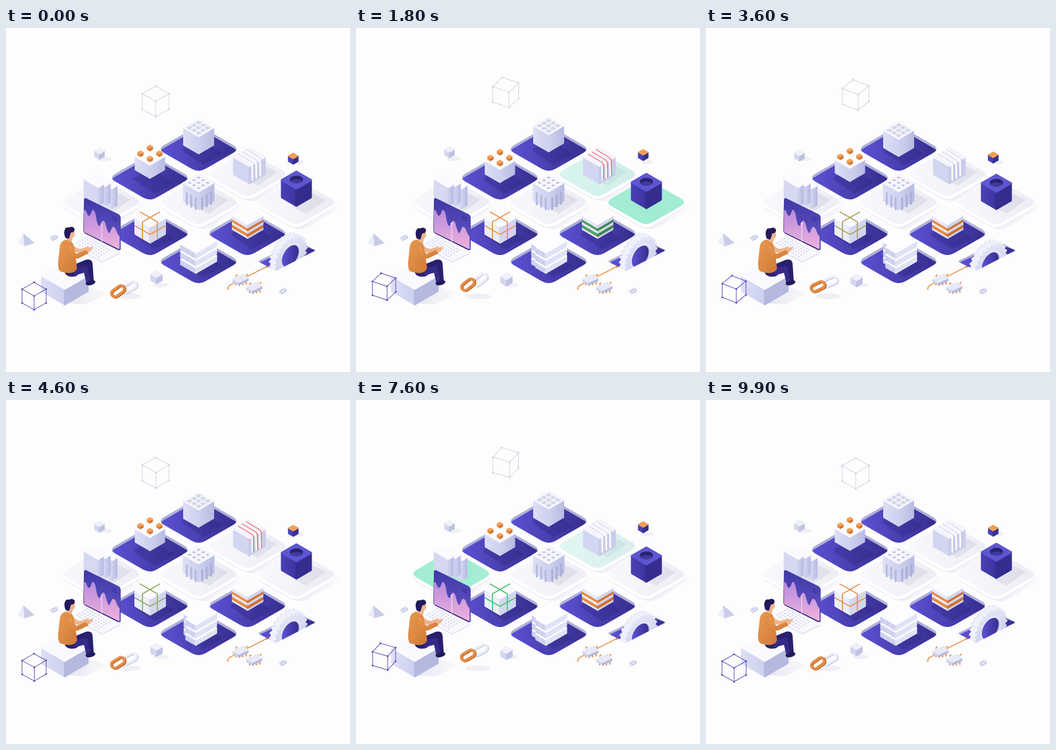
Animation of 600 by 600 pixels, one loop 10 s. Source, as an HTML page:

```html
<!DOCTYPE html>
<html lang="en">
<head>
<meta charset="utf-8">
<title>Isometric workspace</title>
<style>
html, body { margin: 0; width: 100%; height: 100%; overflow: hidden; background: #fdfdfd; }
svg { display: block; width: 100vw; height: 100vh; }
</style>
</head>
<body>
<svg id="stage" viewBox="0 0 600 600"></svg>
<script>
const TAU = Math.PI * 2, LOOP = 10000;
const WHITE = ['#f7f7fd', 'url(#faceL)', 'url(#faceR)'];
const PALE = ['#fcfcff', '#e6e8f8', '#d0d3ef'];
const ORANGE = ['#f5a45d', '#e78a42', '#cf7433'];
const GREEN = ['#5fbf83', '#4aa36a', '#3a8a58'];
const BLUE = ['#5e56d0', 'url(#blueL)', '#352d8e'];

const pt = p => p.map(n => +n.toFixed(2)).join(',');
const poly = (pts, fill, r = 0, extra = '') =>
  `<polygon points="${pts.map(pt).join(' ')}" fill="${fill}"${r ? ` stroke="${fill}" stroke-width="${r}" stroke-linejoin="round"` : ''} ${extra}/>`;
const path = (d, fill, extra = '') => `<path d="${d}" fill="${fill}" ${extra}/>`;
const line = (pts, color, w) =>
  `<polyline points="${pts.map(pt).join(' ')}" fill="none" stroke="${color}" stroke-width="${w}" stroke-linecap="round" stroke-linejoin="round"/>`;
const group = (id, body, extra = '') => `<g id="${id}" ${extra}>${body}</g>`;
const oval = (x, y, rx, ry, fill, extra = '') =>
  `<ellipse cx="${x}" cy="${y}" rx="${rx}" ry="${ry}" fill="${fill}" ${extra}/>`;
const grad = (id, from, to, dir = 'x2="1" y2="0"') =>
  `<linearGradient id="${id}" x1="0" y1="0" ${dir}><stop stop-color="${from}"/><stop offset="1" stop-color="${to}"/></linearGradient>`;

// A prism seen from above: a points down-right, b up-right, both half lengths.
function prism(x, y, a, b, d, [top, left, right], r = 2) {
  const at = (i, j, h = 0) => [x + i * a[0] + j * b[0], y + i * a[1] + j * b[1] + h];
  const L = at(-1, -1), K = at(-1, 1), R = at(1, 1), F = at(1, -1);
  const low = p => [p[0], p[1] + d];
  return poly([L, F, low(F), low(L)], left, r) + poly([F, R, low(R), low(F)], right, r) + poly([L, F, R, K], top, r);
}
const box = (x, y, w, d, colors, r = 3) =>
  prism(x, y, [w / 2, w * 0.29], [w / 2, -w * 0.29], d, colors, r);

// Diamond with rounded corners
function diamond(x, y, w = 72, h = 41.5, t = 0.167) {
  const c = [[-w, 0], [0, -h], [w, 0], [0, h]];
  return c.map((p, i) => {
    const q = c[(i + 1) % 4], o = c[(i + 3) % 4];
    const mix = e => pt([x + p[0] + (e[0] - p[0]) * t, y + p[1] + (e[1] - p[1]) * t]);
    return `${i ? 'L' : 'M'}${mix(o)} Q${pt([x + p[0], y + p[1]])} ${mix(q)}`;
  }).join(' ') + 'Z';
}
function hole(x, y, id) {
  const shape = diamond(x, y);
  return `<clipPath id="${id}">${path(shape, '#000')}</clipPath>` + path(shape, '#aeafd8') +
    `<g clip-path="url(#${id})">${path(diamond(x, y + 6, 74, 42.5), 'url(#tile)')}${poly([[x - 26, y + 2], [x, y - 14], [x + 38, y + 8], [x + 8, y + 25]], '#2c2478', 5, 'opacity=".3"')}</g>`;
}
function slab(x, y, id) {
  return path(diamond(x + 8, y + 9), 'url(#cast)') + path(diamond(x, y + 7), '#dfe0f0') + path(diamond(x, y + 6), '#fff') +
    path(diamond(x, y), 'url(#slabTop)') +
    poly([[x - 6, y + 8], [x + 28, y - 16], [x + 52, y - 4], [x + 18, y + 20]], '#c9c9da', 0, 'opacity=".38"') +
    group(id, path(diamond(x, y), '#9eedd2'), 'opacity="0"');
}
function windows(x, y, step, size, fill) {
  let s = '';
  for (let i = -1; i < 2; i++) for (let j = -1; j < 2; j++)
    s += path(diamond(x + (i + j) * step, y + (i - j) * step * 0.58, size, size * 0.58, 0.1), fill);
  return s;
}
const smallCube = (x, y, colors) => box(x, y, 8.5, 9.5, colors, 1.5);

function tiles() {
  return hole(336, 211, 'h1') + hole(251, 261, 'h2') + slab(421, 255, 'gBack') + slab(166, 303, 'gLeft') +
    slab(336, 304, 'gMid') + slab(506, 304, 'gRight') + hole(251, 358, 'h3') + hole(421, 358, 'h4') + hole(336, 407, 'h5');
}
const topCube = () => box(336, 174, 25.5, 30, ['#f6f6fc', 'url(#faceL)', 'url(#faceR)']) + windows(336, 174, 7.8, 5.8, '#d5d6e9');
function studs() {
  return box(251, 224, 25, 23, ['#fbfbff', 'url(#faceL)', 'url(#faceR)']) +
    [[0, -15], [-16.5, -5], [16.5, -5], [0, 4]].map(([x, y]) => box(251 + x, 222 + y, 4.6, 4.5, ORANGE, 1.5)).join('');
}
function seams(color, w, shift) {
  return [1, 2, 3].map(k => {
    const f = k / 4, x = 397 + 27.5 * f + shift, y = 225 - 16 * f;
    return line([[x + 1, y - 1], [x + 25, y + 13.5], [x + 27.5, y + 17], [x + 28, y + 44]], color, w);
  }).join('');
}
const slices = () => box(424.5, 225, 26.5, 30, ['#f4f4fb', '#d3d6f0', '#c9ccea'], 4) + seams('#fff', 3, -2) +
  seams('#c2c5e4', 1, 0) + group('red', seams('#ef5f70', 1.4, 0), 'opacity="0"');
function books() {
  return [[177, 270], [165, 268], [153, 270]].map(([x, y], i) =>
    prism(x, y - (i ? 2 : 0), [12, 7], [4, -2.4], 34 - i, ['#fafaff', '#d6d9f1', 'url(#faceR)'], 3)).join('');
}
function tower() {
  const slots = [0.2, 0.5, 0.8].map(f =>
    line([[310 + 26 * f, 285 + 15 * f], [310 + 26 * f, 305 + 14 * f]], '#b4b7dc', 3) +
    line([[337 + 26 * f, 299 - 15 * f], [337 + 26 * f, 319 - 15 * f]], '#a9acd4', 3)).join('');
  return box(336, 270, 26, 31, ['#f6f6fc', 'url(#faceL)', 'url(#faceR)']) + slots + windows(336, 270, 7.8, 3.8, '#c5c7e0');
}
const donut = () => box(506.5, 265, 25, 30, BLUE, 4) + oval(506.5, 264, 11.5, 6.7, '#29236f') +
  path('M496 266 Q506.5 261 517 266 Q512 271 506.5 270.7 Q500 271 496 266', '#413a9f');
function straps(color) {
  return [
    [[234, 321], [264, 338], [264, 367]], [[268, 321], [238, 338], [238, 367]],
    [[225, 345], [251, 360], [278, 345]]
  ].map(p => line(p, color, 2)).join('');
}
const parcel = () => box(251.5, 331, 25.5, 28, ['#fbfbff', '#eceef9', '#d3d6ef'], 4) +
  line([[251.5, 348], [251.5, 373]], '#d8daee', 1.5) + straps('#e9944f') + group('strap', straps('#4ccb89'), 'opacity="0"');
function stack() {
  const layer = (y, d, colors) => box(421.5, y, 26, d, colors, 3);
  const core = y => layer(y, 5.5, ORANGE) + group('core' + y, layer(y, 5.5, GREEN), 'opacity="0"');
  return layer(347, 4, PALE) + core(342) + layer(338, 4, PALE) + core(332) + layer(327, 6, PALE);
}
function bars() {
  let s = '';
  for (let row = 2; row >= 0; row--) {
    for (let col = 0; col < 3; col++) {
      const x = 336 + (col - 1) * 9, y = 374 + (col - 1) * 5.2 + row * 13;
      s += `<g class="bar${col}">${prism(x, y, [4, 2.3], [18, -10.4], 9.5, ['#fdfdff', '#cdd0ee', '#e0e2f5'], 2.5)}</g>`;
    }
  }
  return s;
}
function gear() {
  const ring = r => Array.from({ length: 96 }, (_, i) => {
    const q = i / 96 * TAU, rad = r + (i % 4 < 2 ? 3.5 : 0);
    return [rad * Math.cos(q), rad * Math.sin(q)];
  });
  const at = (k, body) => `<g transform="matrix(.866,-.5,0,1,${497 - 10 * k},${391 - 5.8 * k})">${body}</g>`;
  let s = '';
  for (let k = 10; k >= 0; k--) s += at(k / 10, poly(ring(29.5), k === 10 ? '#d7d9ee' : '#f0f0fa'));
  return s + at(0, poly(ring(29.5), 'url(#gearFace)') + '<circle r="20" fill="#f1f1fb"/><circle r="18.5" fill="#c4c6e6"/>') +
    at(0.12, '<circle r="17" fill="url(#tile)"/>');
}
function slot() {
  return poly([[442, 407], [470, 421], [538, 388], [510, 374]], '#aeafd8', 3) +
    poly([[445, 409], [470, 421], [537, 388], [512, 378]], 'url(#tile)', 2) +
    '<clipPath id="slotClip"><polygon points="430,300 440,406 470,424 538,389 560,300"/></clipPath>' +
    `<g clip-path="url(#slotClip)">${group('gear', gear())}</g>`;
}
function chip(x, y) {
  let s = '';
  for (let i = 0; i < 4; i++) {
    const px = x - 9 + i * 6, py = y + 5 - Math.abs(i - 1) * 1.2;
    s += line([[px, py], [px + 1, py + 6]], '#e48d46', 2.2) + line([[px + 1, py - 9], [px + 3, py - 11]], '#e48d46', 2);
  }
  return s + prism(x, y - 1, [5, 2.8], [8, -3.8], 4.5, ['#e8eaf8', '#cfd2ed', '#b6b9dd'], 2);
}
const wires = () => path('M387 456 Q386 451 392 448 L455 416', 'none', 'stroke="#e8924c" stroke-width="1.8" stroke-linecap="round"') +
  oval(455, 416, 2.2, 1.7, '#c9752f') + chip(409, 438) + chip(433, 452);

const capsule = (w, h, color, sw) =>
  `<rect x="${-w / 2}" y="${-h / 2}" width="${w}" height="${h}" rx="${h / 2}" fill="none" stroke="${color}" stroke-width="${sw}"/>`;
const link = (w, h, base, light, sw) =>
  `<g transform="translate(.8,1.6)">${capsule(w, h, base, sw)}</g>${capsule(w, h, light, sw)}`;
const tinyLink = (x, y) => `<g transform="translate(${x},${y}) rotate(-28)">${link(11, 4.5, '#b9bce0', '#e1e3f5', 2)}</g>`;

function person() {
  const skin = '#f0b48c', navy = '#28206d';
  return path('M103 428 Q101 417 118 413 L140 404 Q150 402 151 411 L153 440 L146 441 L141 418 L122 433 Q108 436 103 428', navy) +
    path('M120 420 L136 415 Q142 413 143 421 L147 444 L140 444 L136 427 L118 432', '#352b87') +
    path('M139 444 L148 440 Q155 439 156 443 Q154 448 145 449 Q138 449 139 444', '#211a5a') +
    path('M118 379 Q124 386 131 385 L143 381 L146 384 L133 392 Q122 394 116 387', skin) +
    path('M105 369 Q116 370 118 380 Q122 399 124 419 Q119 432 96 425 Q90 423 91 407 L94 380 Q96 371 105 369', 'url(#shirt)') +
    path('M109 379 Q115 379 118 388 L123 394 L140 387 L144 393 L126 402 Q118 403 112 396', 'url(#shirt)') +
    path('M139 387 L148 382 Q153 381 151 385 L144 392', skin) +
    group('head', path('M106 361 L117 361 L115 372 Q109 374 106 369', skin) + path('M109 352 L119 353 L120 361 Q117 368 110 365', skin) +
      path('M103 365 Q100 355 103 351 Q104 347 110 348 Q115 345 119 349 Q121 353 117 356 L113 357 L110 367 Q106 368 103 365', '#211a58'));
}
function laptop() {
  let keys = '';
  for (let i = 0; i < 9; i++) for (let j = 0; j < 5; j++) {
    const x = 142 + i * 4.7 - j * 4.5, y = 364 + i * 2.9 + j * 2.8;
    keys += poly([[x - 1.8, y], [x, y - 1.1], [x + 2.1, y + 0.2], [x + 0.3, y + 1.4]], '#cfd1ea');
  }
  const screen = 'M136 300 Q136 296 140 298 L197 326 Q200 328 200 331 L200 384 Q200 389 195 387 L139 359 Q135 357 135 353Z';
  const wave = 'M136 318 C141 314 141 331 146 327 C150 323 149 315 153 318 C158 322 157 341 162 345 C165 347 165 338 169 336 C174 335 174 349 179 357 C182 362 183 345 188 347 C193 349 193 360 198 363 L198 386 L136 356Z';
  return poly([[119, 381], [143, 363], [197, 392], [168, 407]], '#dfe0f0', 4) + poly([[119, 379], [143, 361], [197, 390], [168, 405]], '#f8f8fd', 4) + keys +
    path(screen, '#29236f') + path(screen, 'url(#screen)', 'transform="translate(1.8,2.2) scale(.99)"') + path(wave, 'url(#pink)') +
    line([[167, 341], [167, 372]], '#f7e5f7', 1.2) + '<circle id="dot" cx="167" cy="341" r="1.8" fill="#f6e4ee"/>' +
    line([[186, 329], [193, 332.5]], '#312a86', 1.3) + line([[186, 333], [193, 336.5]], '#312a86', 1.3);
}
const shadow = (x, y, w, h) => oval(x, y, w, h, '#e4e4ee', 'opacity=".55"');
const seat = () => poly([[104, 480], [146, 452], [178, 463], [138, 482]], 'url(#cast)') +
  box(102.5, 432, 40, 27, ['#fafafe', 'url(#faceL)', '#b5b8df'], 3);

// Wire cube turning about its upright axis
function wire(x, y, r, h, turn) {
  const v = [0, 1, 2, 3].map(k => {
    const q = k * TAU / 4 - turn;
    return [x + r * Math.cos(q), y + r * 0.565 * Math.sin(q)];
  });
  const [R, F, L, B] = v, low = p => [p[0], p[1] + h];
  const all = [R, F, L, B, low(R), low(F), low(L)];
  return { dots: all, d: `M${pt(B)}L${pt(R)}L${pt(F)}L${pt(L)}Z M${pt(R)}L${pt(low(R))}L${pt(low(F))}L${pt(low(L))}L${pt(L)}M${pt(F)}L${pt(low(F))}` };
}
function drawWire(id, color, w, ...args) {
  const { dots, d } = wire(...args);
  el(id).innerHTML = path(d, 'none', `stroke="${color}" stroke-width="${w}" stroke-linejoin="round"`) +
    dots.map(p => `<circle cx="${p[0]}" cy="${p[1]}" r="1.6" fill="${color}"/>`).join('');
}

const down = 'x2="0" y2="1"';
document.getElementById('stage').innerHTML = '<defs>' +
  grad('tile', '#5c52d4', '#362d8d') + grad('faceL', '#dddff5', '#cdd0ef') + grad('faceR', '#cfd2ee', '#b9bce2') +
  grad('blueL', '#4840b5', '#3c349f') + grad('slabTop', '#f8f8fc', '#ededf5') + grad('cast', '#e6e6ef', '#fafafc') +
  grad('gearFace', '#e3e5f7', '#c9cceb', down) + grad('shirt', '#e99a50', '#cf7937', 'x2="1" y2="1"') +
  grad('screen', '#4038a8', '#6557c4', down) + grad('pink', '#b78bdc', '#f0b2dc', down) + '</defs>' +
  tiles() + group('topCube', topCube()) + group('studs', studs()) + slices() + books() + tower() +
  group('donut', donut()) + parcel() + stack() + bars() + slot() + wires() +
  shadow(171, 228, 13, 4) + shadow(509, 234, 10, 4) + shadow(270, 448, 13, 4) + shadow(213, 468, 22, 5) +
  group('c1', smallCube(163, 214, ['#eff0f9', '#d5d7ed', '#bfc2df'])) +
  group('c2', smallCube(501, 223, ['#f0a058', '#4a42b4', '#372f91'])) +
  group('c3', box(262.5, 429, 10, 11, ['#eff0fa', '#d3d6ef', '#bfc2e2'], 1.5)) +
  poly([[30, 358], [21, 375], [32, 381]], '#eceef9') + poly([[30, 358], [32, 381], [50, 375]], '#c9cce8') +
  tinyLink(83, 365) + tinyLink(482, 458) + seat() + laptop() + person() +
  group('linkW', link(27, 12, '#c3c6e6', '#eeeffa', 4)) + group('linkO', link(25, 12, '#b9652b', '#e58c45', 4.5)) +
  '<g id="wireTop"></g><g id="wireLeft"></g>';

const el = id => document.getElementById(id);
const move = (id, x, y, turn = 0) => el(id).setAttribute('transform', `translate(${x.toFixed(2)},${y.toFixed(2)}) rotate(${turn.toFixed(2)})`);
const fade = (id, v) => el(id).setAttribute('opacity', v.toFixed(3));

// Value at t from [time, value] steps, eased between them
function track(t, keys) {
  if (t <= keys[0][0]) return keys[0][1];
  for (let i = 1; i < keys.length; i++) {
    const [t0, v0] = keys[i - 1], [t1, v1] = keys[i];
    if (t <= t1) return v0 + (v1 - v0) * (1 - Math.cos(Math.PI * (t - t0) / (t1 - t0))) / 2;
  }
  return keys[keys.length - 1][1];
}
const glow = {
  gMid: [[450, 0], [900, 0.8], [1000, 0.7], [1200, 0.33], [1500, 0]],
  gRight: [[500, 0], [900, 1], [1700, 1], [2450, 0]],
  gBack: [[1600, 0], [2100, 1], [2600, 0.25], [2900, 0]],
  gLeft: [[2000, 0], [2450, 1], [2700, 0.9], [3200, 0]]
};
const blink = {
  red: [[930, 0], [1000, 0.4], [1250, 1], [2720, 1], [2870, 0.5], [3050, 0]],
  strap: [[100, 0], [500, 1], [940, 1], [1270, 0.55], [1500, 0]],
  core342: [[1450, 0], [1850, 1], [2550, 1], [2870, 0.6], [3150, 0]]
};
blink.core332 = blink.core342;
const gearPath = [[0, 7.5], [1100, 0], [2600, 18.5], [3600, 20], [4600, 15], [4900, 8.8], [5000, 7.5]];

function render(t) {
  const u = t % 5000, v = t % (LOOP / 3), q = u / 5000 * TAU;
  const lift = (1 - Math.cos(q)) / 2, late = Math.cos(q - 0.5);
  drawWire('wireTop', '#d3d3e3', 1.1, 261, 114.5 - 19 * lift, 23.5, 27, 0.31 * lift);
  drawWire('wireLeft', '#5a50b5', 1.1, 49, 455.5 - 20 * lift, 21, 24, 0.31 * lift);
  move('topCube', 0, -4.5 * Math.sin(q));
  move('studs', 0, 9 * lift);
  move('donut', 0, 3.5 - 3.7 * late);
  move('c1', 0, 0.5 - 3.3 * Math.sin(q));
  move('c2', 0, -3 + 3.5 * Math.cos(q + 0.5));
  move('c3', 0, 3.5 - 3.7 * late);
  const tilt = -8 * Math.sin(q);
  move('linkO', 195, 459 - 14 * lift, -36 + 5 * lift + tilt);
  move('linkW', 215 + lift, 452 - 16 * lift, -30 + tilt);
  move('gear', 0, track(u, gearPath));
  move('head', 2.5 * Math.min(1, lift * 2.5), 1.5 * Math.min(1, lift * 2.5));
  const slide = 3.5 * (1 - Math.cos(t / LOOP * TAU));
  document.querySelectorAll('.bar0').forEach(b => b.setAttribute('transform', `translate(${slide * 0.866},${-slide * 0.5})`));
  el('dot').setAttribute('opacity', Math.min(1, lift * 3));
  for (const id in glow) fade(id, track(u, glow[id]));
  for (const id in blink) fade(id, track(v, blink[id]));
}

const start = performance.now();
function tick(now) {
  render(Math.floor(Math.max(0, now - start) % LOOP / 100) * 100);
  requestAnimationFrame(tick);
}
render(0);
requestAnimationFrame(tick);
</script>
</body>
</html>
```
